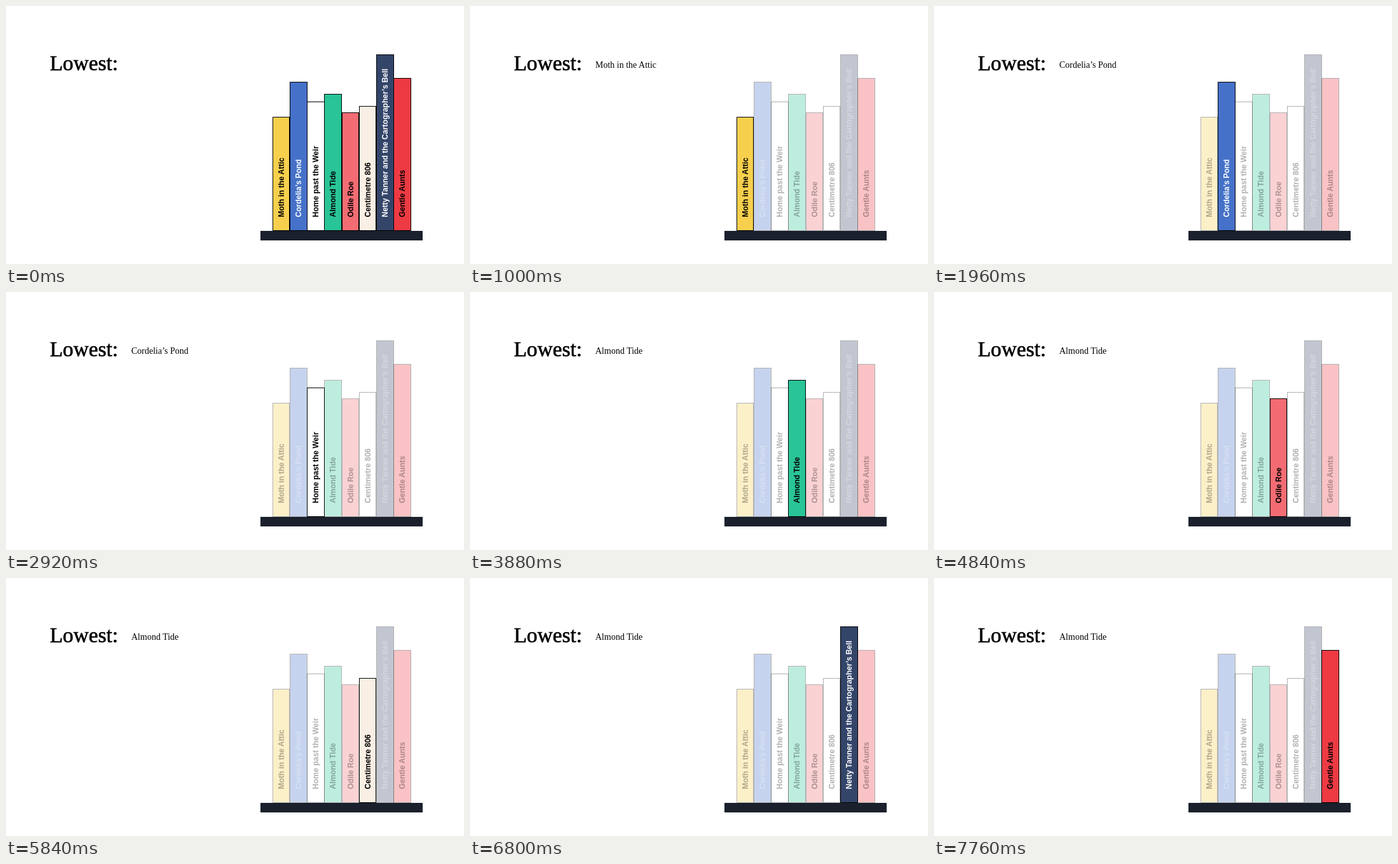
Recreate the animation shown at these times as an HTML page. Size 720 by 405 pixels, loop 8000 ms.

```html
<!DOCTYPE html>
<html lang="en">
<head>
<meta charset="utf-8">
<title>Finding the lowest title</title>
<style>
  html, body { margin: 0; width: 100%; height: 100%; overflow: hidden; background: #fff; }
  svg { display: block; width: 100vw; height: 100vh; }
  .serif { font-family: "Liberation Serif", "Times New Roman", serif; }
  .heading { font-size: 33.3px; stroke: #000; stroke-width: .65px; }
  .answer { font-size: 14px; }
  .spine { font: bold 12px "Liberation Sans", Arial, sans-serif; }
</style>
</head>
<body>
<svg viewBox="0 0 720 405">
  <text class="serif heading" x="69" y="101">Lowest:</text>
  <text class="serif answer" id="answer" x="197" y="97"></text>
  <g id="books"></g>
  <rect x="400" y="353" width="255" height="15" fill="#1a202c"/>
</svg>
<script>
const LOOP = 8000;
const FLOOR = 353;
const DIM = 0.3;

const books = [
  { title: "Moth in the Attic", x: 419, w: 27, top: 174, fill: "#f6d04d" },
  { title: "Cordelia’s Pond", x: 446, w: 28, top: 119, fill: "#4571c8", ink: "#fff" },
  { title: "Home past the Weir", x: 473, w: 28, top: 150, fill: "#fff" },
  { title: "Almond Tide", x: 500, w: 28, top: 138, fill: "#29c498" },
  { title: "Odile Roe", x: 528, w: 27, top: 167, fill: "#f46c73" },
  { title: "Centimetre 806", x: 555, w: 27, top: 157, fill: "#f9efe4", dimFill: "#fff" },
  { title: "Netty Tanner and the Cartographer’s Bell", x: 582, w: 28, top: 76, fill: "#34456a", ink: "#fff" },
  { title: "Gentle Aunts", x: 609, w: 28, top: 113, fill: "#ed3a43" },
];

// When the scan reaches each book
const steps = [1000, 1960, 2920, 3880, 4840, 5840, 6800, 7760];

const answer = document.getElementById("answer");
const shelf = document.getElementById("books");

function add(tag, attrs) {
  const node = document.createElementNS("http://www.w3.org/2000/svg", tag);
  for (const [key, value] of Object.entries(attrs)) node.setAttribute(key, value);
  return shelf.appendChild(node);
}

for (const book of books) {
  book.cover = add("rect", {
    x: book.x + 0.5, y: book.top + 0.5,
    width: book.w - 1, height: FLOOR - book.top - 1,
    stroke: "#000",
  });
  book.label = add("text", {
    class: "spine", fill: book.ink || "#000",
    transform: `translate(${book.x + 18} 331.5) rotate(-90)`,
  });
  book.label.textContent = book.title;
}

function lowestUpTo(index) {
  return books.slice(0, index + 1)
    .map(book => book.title)
    .reduce((low, title) => (title < low ? title : low));
}

function render(time) {
  const current = steps.filter(step => step <= time).length - 1;
  books.forEach((book, i) => {
    const lit = current < 0 || i === current;
    book.cover.style.fill = lit ? book.fill : book.dimFill || book.fill;
    book.cover.style.opacity = book.label.style.opacity = lit ? 1 : DIM;
  });
  answer.textContent = current < 0 ? "" : lowestUpTo(current);
}

const start = performance.now();
function tick() {
  render((performance.now() - start) % LOOP);
  requestAnimationFrame(tick);
}
tick();
</script>
</body>
</html>
```
